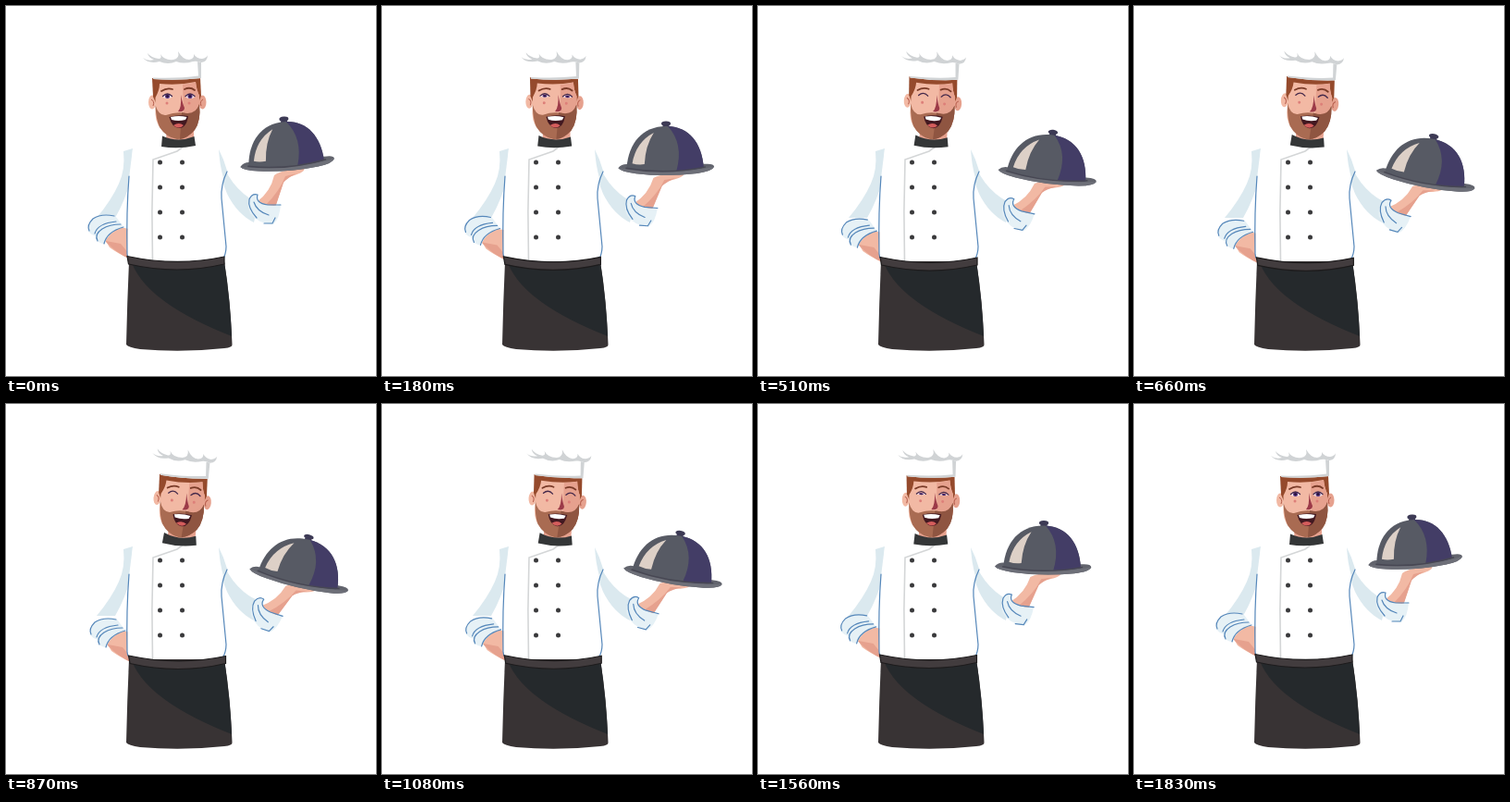
An HTML page for the animation above (1860 ms loop, 400 by 400 pixels).

```html
<!DOCTYPE html>
<html>
<head>
<meta charset="utf-8">
<style>
html, body { margin: 0; width: 100%; height: 100%; overflow: hidden; background: #fff; }
svg { display: block; width: 100vw; height: 100vh; }
.line { fill: none; stroke: #5587ba; stroke-width: 1.2; stroke-linecap: round; }
.cuff { fill: #e6f1f6; }
.cloth { fill: #dbe9ef; }
.skin { fill: #f2b9a4; }
.shade { fill: #e6a18e; }
.hair { fill: #954a2c; }
.brow { fill: none; stroke: #7a3b28; stroke-width: 1.8; stroke-linecap: round; }
.lid { fill: none; stroke: #43284a; stroke-width: 1.3; stroke-linecap: round; }
</style>
</head>
<body>
<svg viewBox="0 0 400 400">
  <!-- resting arm -->
  <path class="cloth" d="M127 157L137 154L135 187Q129 210 118 229L98 229Q114 210 122 192Q129 177 127 157Z"/>
  <g id="rest">
    <path class="skin" d="M106 251L120 238Q127 240 133 241V273Q120 267 112 261Z"/>
    <path class="shade" d="M108 254L124 257L133 268V273Q119 267 106 253Z"/>
    <path class="cuff" d="M89 240Q92 228 104 226Q114 224 119 228L127 239Q112 243 106 257Q98 256 97 249Q88 246 89 240Z"/>
    <path class="line" d="M90 243Q87 237 94 230Q103 224 117 227M96 246Q99 235 119 233M99 254Q95 247 104 241Q112 236 124 236M106 257Q109 244 127 239"/>
  </g>

  <!-- serving arm -->
  <path class="cloth" d="M237 177Q244 192 257 203Q267 211 273 212L268 234Q250 225 239 203L234 190Z"/>
  <g id="serve">
    <path class="skin" d="M271 212Q286 201 290 183Q298 177 322 175Q325 179 309 184Q303 185 300 190L291 217Z"/>
    <path class="shade" d="M280 216Q296 200 302 184L314 181Q304 186 300 191L291 218Z"/>
    <path class="cuff" d="M263 209Q266 203 272 204Q271 214 283 215Q292 217 297 214Q296 230 289 236Q273 236 264 224Q260 216 263 209Z"/>
    <path class="line" d="M272 204Q266 202 263 209Q261 218 271 229M272 204Q269 213 283 215L297 215M268 212Q271 222 284 226M291 229L288 235L279 235"/>
  </g>
  <g id="dish">
    <ellipse cy="-46" rx="5" ry="2.6" fill="#3d3a55"/>
    <path d="M-3 -45H3L4 -41H-4Z" fill="#3d3a55"/>
    <path d="M-51 2Q-47 -3 -40 -2H40Q51 -3 51 1Q49 6 33 8Q0 12 -32 8Q-48 6 -51 2Z" fill="#62646d"/>
    <path d="M-42 2C-40 -25 -25 -43 0 -43C24 -43 38 -25 40 2Q0 9 -42 2Z" fill="#575a64"/>
    <path d="M2 -43C25 -42 38 -25 40 2Q30 5 11 5Q19 -24 2 -43Z" fill="#433d66"/>
    <path d="M-36 -3Q-32 -26 -13 -36Q-22 -22 -23 -2Q-30 -1 -36 -3Z" fill="#ddd0c7"/>
    <path d="M-51 2Q0 11 51 1Q49 6 33 8Q0 12 -32 8Q-48 6 -51 2Z" fill="#6d6f78"/>
    <path d="M-43 2Q0 10 42 1" fill="none" stroke="#474753" stroke-width="1.5"/>
  </g>

  <!-- jacket -->
  <path d="M137 154L172 147H204L230 153L236 178L233 195L238 267L233 280H134L131 268L133 186Z" fill="#fff"/>
  <path class="cloth" d="M230 155L235 166L239 178L235 186Q231 172 230 155Z"/>
  <path class="line" d="M133 184Q130 222 131 268Q131 272 134 275M239 179Q232 193 233 208L238 260Q238 268 234 275"/>
  <path d="M193 151L185 157L159 166Q157 222 158.500 278" fill="none" stroke="#d4d6d7" stroke-width="1.6"/>
  <g id="buttons" fill="#3a3a3c"></g>

  <!-- apron -->
  <path d="M133 276Q131 320 130 366Q132 369 145 371Q190 375 236 370Q245 369 244.500 366Q243 320 236 276Z" fill="#383334"/>
  <path d="M137 280Q155 322 244 357Q242 315 236 277Z" fill="#25292c"/>
  <path id="belt" d="M131 270.500Q185 282 236 271V279Q185 291 132.500 279Z" fill="#423c3e" stroke="#1d1b1c" stroke-width="1.2"/>

  <g id="head">
    <path class="shade" d="M174 130H203V145Q188 151 173 145Z"/>
    <path d="M169 140.500Q186 148 203.500 141L205 151Q186 155 168 152Z" fill="#343637"/>
    <ellipse class="skin" cx="158" cy="104" rx="4" ry="7.500"/>
    <ellipse class="shade" cx="212.500" cy="104" rx="4" ry="7.500"/>
    <path d="M157 101Q161 103 159 108M213 101Q209 103 211 108" fill="none" stroke="#b55d4c"/>
    <path class="hair" d="M158 78H210L211 97L207 107H163L159 98Z"/>
    <path class="skin" d="M161.500 99Q166 91 166 84Q187 86 205 82Q206 91 209 97V119Q206 133 195 140Q184 145 173 138Q162 130 161.500 117Z"/>
    <path class="shade" d="M191 84.500Q200 84 205 82Q206 91 209 97V119H192Z"/>
    <path d="M161.500 107Q165 119 173 118Q186 113 199 117Q206 116 209 106Q211 124 204 134Q196 144 185 144Q173 142 166 131Q162 122 161.500 107Z" fill="#a96b52"/>
    <path d="M190 115Q205 119 209 106Q211 124 204 134Q196 143 188 144Z" fill="#8f5541"/>
    <path d="M176.500 120Q187 117 197 119Q195 132 187 132Q179 131 176.500 120Z" fill="#421820"/>
    <path d="M178 120Q187 118 195.500 120L194 123Q186 125 179 123Z" fill="#fff"/>
    <path d="M181 129Q187 125 192 129Q187 134 181 129Z" fill="#d45d5c"/>
    <path d="M189 96Q191 106 193 110Q193 115 186 114Q190 110 189 96Z" fill="#9c3a48"/>
    <path class="brow" d="M168 92Q174 88 180 90M193 90Q199 87 204 91"/>
    <g id="eyes"></g>
    <g fill="#dd7f79"><circle cx="174" cy="105" r="1.500"/><circle cx="198" cy="105" r="1.500"/></g>
    <!-- hat -->
    <path d="M159 79L160 62L148 57L160 49H210L219 57L211 62V78Q185 81 159 79Z" fill="#fff"/>
    <g fill="#d0d3d5">
      <path d="M148 56Q153 60 160 58Q154 56 153 51Q157 56 165 57Q169 57 167 52Q171 59 181 58Q188 57 186 49Q191 58 198 58Q204 57 203 52Q206 57 212 57Q217 56 218 53Q218 60 211 61Q206 59 202 60Q192 63 184 60Q175 64 166 60Q154 63 148 56Z"/>
      <path d="M207 60L211 61V78Q185 81 159 79V77.500Q186 78.500 208 75.500Z"/>
    </g>
  </g>
</svg>
<script>
const $ = id => document.getElementById(id);
const move = (id, value) => $(id).setAttribute('transform', value);
const LOOP = 1860, STEP = 30;
// [time, sway]
const keys = [[0, 0], [360, .49], [660, .88], [870, 1], [930, .98],
  [1290, .6], [1560, .32], [1830, 0], [1860, 0]];

for (const y of [169, 196, 223, 250])
  for (const x of [166.5, 190.5])
    $('buttons').innerHTML += `<circle cx="${x}" cy="${y}" r="2.5"/>`;

for (const x of [174.5, 199])
  $('eyes').innerHTML += `<g transform="translate(${x} 97.5)">
    <g class="open"><ellipse rx="5" ry="2.4" fill="#f4e6ea"/><circle r="2.5" fill="#55307c"/><circle r="1.2" fill="#211331"/></g>
    <path class="lid" d="M-5 0Q0 -5 5 0"/></g>`;

function sway(t) {
  const i = keys.findIndex(k => k[0] > t);
  const [t0, a] = keys[i - 1], [t1, b] = keys[i];
  return a + (b - a) * (t - t0) / (t1 - t0);
}

function draw(now) {
  const t = Math.floor(now % LOOP / STEP) * STEP;
  const p = sway(t);
  move('rest', `translate(${2 * p} ${6 * p})`);
  move('serve', `translate(${2 * p} ${p}) rotate(${18 * p} 255 222)`);
  move('dish', `translate(${304 + 13 * p} ${168 + 20.5 * p}) rotate(${-4.5 + 17.5 * p}) scale(${1 + .07 * p} 1)`);
  move('belt', `translate(${1.5 * p} ${1.5 * p})`);
  move('head', `translate(${p} 0) rotate(${5.5 * p} 186 150)`);
  const open = Math.max(0, 1 - p / .55);
  for (const eye of document.querySelectorAll('.open'))
    eye.setAttribute('transform', `scale(1 ${open})`);
}

const start = performance.now();
function tick() {
  draw(performance.now() - start);
  requestAnimationFrame(tick);
}
tick();
</script>
</body>
</html>
```
